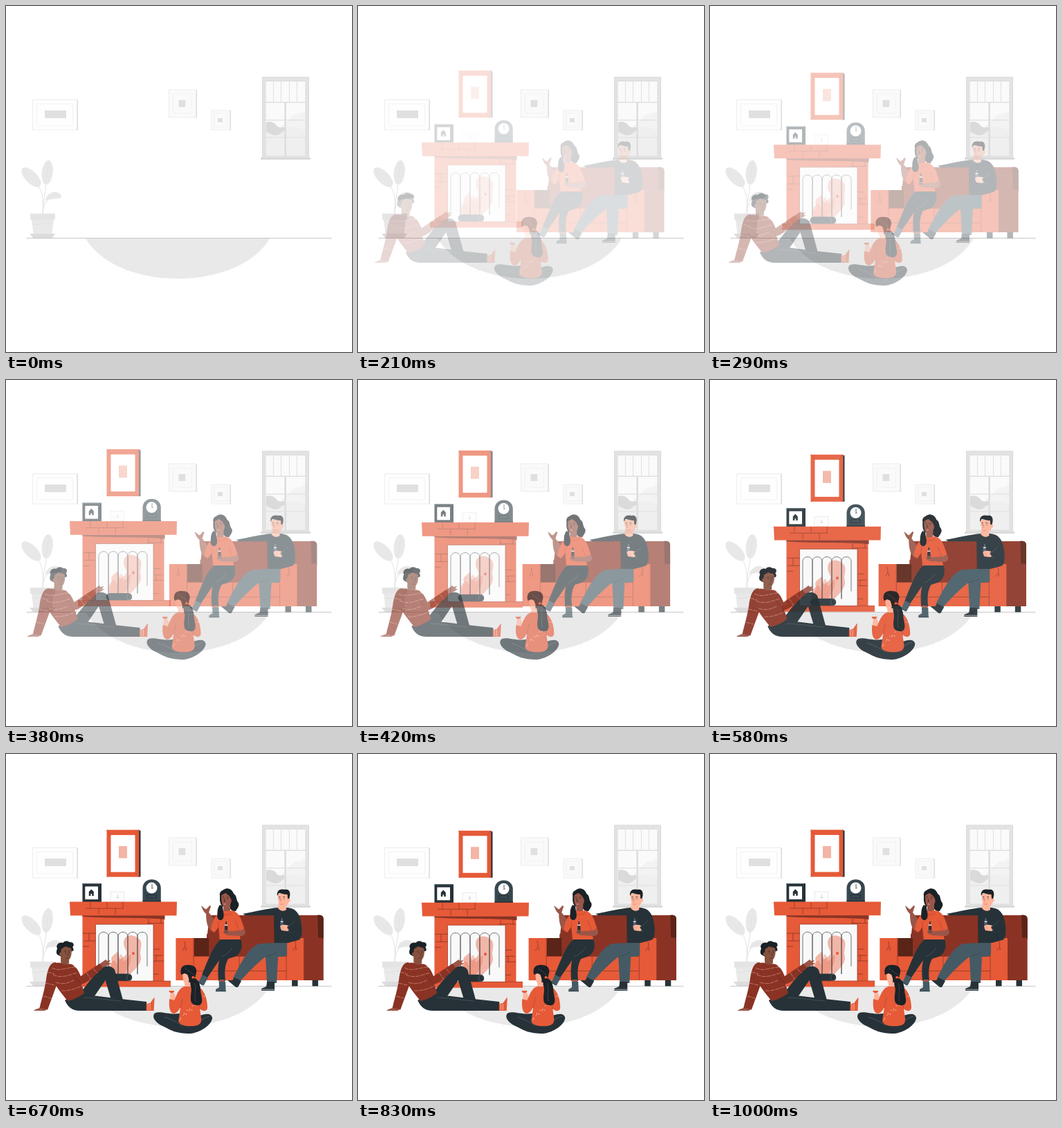
Animation of 500 by 500 pixels, one loop 1.04 s. Source, as an HTML page with a canvas:

```html
<!DOCTYPE html>
<html lang="en">
<head>
<meta charset="utf-8">
<title>Evening at home</title>
<style>
html, body { margin: 0; width: 100%; height: 100%; overflow: hidden; background: #fff; }
canvas { display: block; width: 100vmin; height: 100vmin; margin: 0 auto; }
</style>
</head>
<body>
<canvas id="stage"></canvas>
<script>
const SIZE = 500, LOOP = 1040, FPS = 24, SLIDE = 20;
const ORANGE = '#e65a38', RED = '#8a3324', BROWN = '#5b2418', DARK = '#263238',
      SLATE = '#455a64', HAIR = '#1b2227', TAN = '#9a5648', PEACH = '#ffb59b', GREY = '#e0e0e0';

const stage = document.getElementById('stage');
const scale = window.devicePixelRatio || 1;
const layer = document.createElement('canvas');
for (const c of [stage, layer]) c.width = c.height = SIZE * scale;
const out = stage.getContext('2d'), tmp = layer.getContext('2d');
let g = out;

const fill = (color, d) => { g.fillStyle = color; g.fill(new Path2D(d)); };
const line = (color, w, d) => { g.strokeStyle = color; g.lineWidth = w; g.stroke(new Path2D(d)); };
const rect = (color, x, y, r, b) => { g.fillStyle = color; g.fillRect(x, y, r - x, b - y); };
const oval = (color, x, y, rx, ry = rx, turn = 0) => {
  g.fillStyle = color;
  g.beginPath();
  g.ellipse(x, y, rx, ry, turn, 0, 7);
  g.fill();
};

// Cubic curve shared by movement and fading.
function ease(t) {
  const bez = (a, b, s) => 3 * (1 - s) * (1 - s) * s * a + 3 * (1 - s) * s * s * b + s * s * s;
  let lo = 0, hi = 1;
  for (let i = 0; i < 24; i++) {
    const mid = (lo + hi) / 2;
    if (bez(0.36, 0.5, mid) < t) lo = mid; else hi = mid;
  }
  return bez(-0.01, 1.38, lo);
}

function paleFrame(x, y, r, b, gap, face) {
  rect(GREY, r - 1, y, r + 1.6, b + 0.5);
  rect(face, x, y, r, b);
  line('#e6e6e6', 0.7, `M${x} ${b}V${y}H${r}V${b}Z`);
  line('#ebebeb', 0.6, `M${x + gap} ${y + gap}H${r - gap}V${b - gap}H${x + gap}Z`);
}

function windowPane() {
  rect('#e3e3e3', 370, 102.5, 438, 219);
  rect('#dadada', 368, 219, 440, 222);
  line('#d6d6d6', 0.7, 'M370.5 219V103H437.5V219');
  rect('#fafafa', 375, 108.5, 433, 217);
  fill('#f3f3f3', 'M375 178C390 182 402 172 410 163C415 157 420 153 425 156C428 153 431 152 433 152V191H375Z');
  fill('#efefef', 'M375 182C395 187 405 176 412 175C420 174 427 180 433 178V217H375Z');
  fill('#dadada', 'M376 168C383 166 388 168 392 174C396 177 400 175 403 175V180C397 183 395 187 390 187C384 187 381 183 376 182Z');
  line(GREY, 1, 'M386.5 109V139M397.5 109V139M409.5 109V139M420.5 109V139');
  rect(GREY, 375, 138.5, 433, 140);
  rect('#dedede', 402.3, 140, 405, 217);
  line(GREY, 1.2, 'M375 164.8H433M375 190H433');
  line('#d9d9d9', 0.8, 'M375 108.5H433V217H375Z');
}

function plant() {
  line('#e0e0e0', 0.9, 'M53 300C54 283 54 270 46 259M53 300C53 285 57 270 58 257M53 296C55 287 58 281 63 278');
  oval('#e8e8e8', 36.5, 247.5, 8.7, 18, -0.78);
  oval('#e8e8e8', 59.7, 240.5, 8, 17.6, 0.12);
  fill('#e8e8e8', 'M57 282C58 273 65 268 73 269C78 270 81 274 80 277C74 280 65 277 57 282Z');
  line('#dedede', 0.5, 'M25 236L47 260M62 226L57 255M60 279C66 274 72 273 78 275');
  rect('#e4e4e4', 35, 300, 71, 308.5);
  fill('#e9e9e9', 'M37 308.5H69L66.5 330H39.5Z');
  line('#dcdcdc', 0.7, 'M37 309H69M40 315C50 318 59 309 67 315');
  fill('#dcdcdc', 'M34 329H71L67 335H39Z');
}

function room() {
  rect('#fff', 0, 0, SIZE, SIZE);
  paleFrame(38.5, 135.5, 102.5, 179, 6, '#fefefe');
  rect(GREY, 56, 151, 87, 162);
  paleFrame(235.5, 121, 274.5, 161, 6, '#fafafa');
  rect(GREY, 249.5, 136, 259.3, 146);
  paleFrame(297, 151, 323.5, 179, 4, '#fafafa');
  rect(GREY, 306, 162, 313, 168);
  windowPane();
  plant();
  for (let i = 0; i < 15; i++) {
    const x = 160 + i * 12.5, k = (x - 248) / 133;
    const y = 336 + 58 * Math.pow(1 - k * k, 0.75);
    line('#f3f3f3', 0.6, `M${x} ${y - 2}v7`);
  }
  fill('#e9e9e9', 'M115 335.5C135 371 187 394 248 394C309 394 362 371 381 335.5Z');
  line('#b9b9b9', 0.8, 'M29.5 335.5H470.5');
}

function redFrame() {
  fill(DARK, 'M191 109.5L194.5 111V177.5H191Z');
  rect(ORANGE, 145.5, 109.5, 192.3, 177.5);
  line('#b9442a', 0.6, 'M145.5 109.5L151.5 117M192 109.5L186.5 117M145.5 177.5L151.5 171M192 177.5L186.5 171');
  rect('#fff', 151.5, 117, 186.5, 170.5);
  rect('#f3b5a5', 163, 133, 175, 150.5);
}

function mantelItems() {
  rect(DARK, 110.5, 187, 138, 214);
  rect(SLATE, 110.5, 187, 136, 188.2);
  rect('#fff', 114.3, 191.3, 133, 210);
  fill(DARK, 'M119.8 199L123.3 195.3L126.8 199V204.8H124.2V202H122.4V204.8H119.8Z');

  rect('#fdfdfd', 151, 199, 171, 213.5);
  line('#dedede', 0.7, 'M151 213V199H171V213Z');
  line('#c9c9c9', 0.8, 'M161.5 203.5V209M159.5 207.5H163');

  fill('#37474f', 'M197.5 213.5V194C197.5 177 223.8 177 223.8 194V213.5Z');
  rect(DARK, 197.5, 211.5, 224, 213.7);
  oval('#fff', 210.5, 193.5, 8);
  line(DARK, 0.8, 'M211 187.5V194.5L212.5 193');
  line('#1f2a30', 0.8, 'M203.5 203.5H217.5V208H203.5Z');
}

function fireplace() {
  mantelItems();
  rect(ORANGE, 110.5, 233, 228.5, 329);
  fill(RED, 'M110.5 233H229.5V239C200 236 160 238 110.5 235Z');
  rect('#f9f9f9', 129.5, 246, 213, 328);
  line(RED, 0.7, 'M129.5 328V246H213V328');
  fill(ORANGE, 'M92 213.5H247L246.5 233.3H93Z');
  line(RED, 0.7, 'M115 223H170M122 214V223M146 214V223M169 214V223M134 223V232M158 223V232');
  line(RED, 0.8, 'M204 244.5H228M206 238V244.5M224 238V245M111 259H130M120 259V270M112 270H129M111 278H120M213 282H223M213 291H227M217 291V299M213 299H228M213 318H221');

  g.globalAlpha = 0.42;
  fill(ORANGE, 'M174 264C180 260 189 263 194 269C198 277 192 284 195 293C196 303 186 311 180 318H150C145 312 149 304 153 300C150 291 158 291 160 286C166 288 161 296 165 297C170 293 177 290 173 283C169 276 169 268 174 264Z');
  g.globalAlpha = 0.3;
  fill(ORANGE, 'M150 318C148 310 153 306 154 299C160 297 158 304 162 305C160 296 163 293 166 289C171 293 168 300 171 299C176 297 176 291 180 290C182 300 176 312 170 318Z');
  g.globalAlpha = 1;
  oval(ORANGE, 184, 288, 1.9, 2.2);
  fill(DARK, 'M149 317.5H177C184 318 184 328 177 328H149C143 327 143 318.5 149 317.5Z');
  oval(SLATE, 177.5, 322.8, 3.5, 4.8);
  oval(DARK, 177.8, 322.8, 2.8, 4);
  for (let i = 0; i < 5; i++) {
    const x = 134 + i * 14;
    line('#3c4448', 0.75, `M${x} 318V264C${x} 255 ${x + 14} 255 ${x + 14} 264V${i < 4 ? 318 : 307}`);
  }
  rect(ORANGE, 104, 327.8, 238, 336.5);
  line(RED, 0.6, 'M104 328H238');
}

function sofa() {
  rect(DARK, 413, 326, 421.5, 335.5);
  rect(DARK, 442.5, 326, 451, 335.5);
  fill(RED, 'M294 233H448C456 232 458.7 234 458.7 239V268H290Z');
  fill(BROWN, 'M450 233C457 232 458.7 235 458.7 239V266H451Z');
  rect(RED, 290, 260, 406, 294);
  line(BROWN, 0.8, 'M387.5 233V292');
  rect(BROWN, 271, 266, 293, 293);
  rect(ORANGE, 270, 292, 406, 327);
  line(RED, 0.7, 'M271 313.5H405M271 292.5H405M337 293V313');
  rect(ORANGE, 245.3, 266, 271.3, 327);
  rect(RED, 429, 265.5, 458.7, 327);
  rect(ORANGE, 405, 266, 430, 327);
  line(RED, 0.7, 'M271 266V327M405 266V327');
  line(RED, 0.8, 'M257 270C260 275 259 279 255 284M260 279V284M417 270C420 275 419 279 414 284M419 279V284');
}

function bottle(x, y, color) {
  fill(color, `M${x - 0.9} ${y}h1.8v5l1.3 3v8h-4.4v-8l1.3-3Z`);
  rect('#e9e9e9', x - 2, y + 4.5, x + 2, y + 6);
}

function hostess() {
  fill(HAIR, 'M313 197C320 191 327 196 329 202C334 205 332 210 335 214C339 219 333 224 332 227C327 228 324 224 321 221L312 220C308 214 309 209 309 205C308 201 310 198 313 197Z');
  fill(TAN, 'M314 216H324V231H314Z');
  fill(TAN, 'M311 205C312 199 322 199 325 204C328 211 324 220 319 222C313 222 311 217 311 205Z');
  fill(HAIR, 'M310 206C309 199 319 195 325 199C330 203 329 211 326 213C325 207 321 203 317 201C315 202 312 203 310 206Z');
  line(HAIR, 0.7, 'M312.5 206.5l2-.5M318.5 207l3 .3M316 209l-1 4h2');
  oval(HAIR, 314, 208.8, 0.5);
  oval(HAIR, 320, 209.5, 0.5);
  line('#e9d3cd', 0.7, 'M314.5 217h3');
  fill(TAN, 'M300 257C291 255 289 242 289 231C286 229 283 223 282 219L288 224C289 225 291 223 294 219L296 220L293 229L300 238Z');
  fill(ORANGE, 'M314 226C319 229 324 226 327 226C337 229 340 239 344 252L340 258L337 257L339 271H309L307 250L301 258L296 254C297 244 302 230 314 226Z');
  line('#b9442a', 0.7, 'M314 231C318 233 323 232 327 230M331 241L337 257M307 242L307 251');
  fill(HAIR, 'M309 218C304 224 306 231 305 235C306 242 314 242 314.5 234C315 230 313 226 313 220Z');
  fill(TAN, 'M344 252C348 259 345 263 339 263L320 262L314 259L315 254L323 256L339 255Z');
  bottle(318, 242, DARK);
  line(TAN, 2.2, 'M315 255L321 256M315 258L321 259');
  fill(DARK, 'M310 268H339C343 278 339 290 330 293L321 296C315 306 316 319 317 328H307C306 316 306 307 308 298L291 323L283 319C291 300 299 277 310 268Z');
  line('#53636b', 0.6, 'M311 293C317 291 323 286 327 280');
  fill(SLATE, 'M283 319L292 323L288 330L286 334C283 335 278 330 275 328L280 327Z');
  rect(TAN, 308, 326, 316, 331);
  fill(SLATE, 'M307.5 329H317L317.5 343H303V340L308 337Z');
  line(DARK, 0.8, 'M303 342.8H318M275 328.5L285 334.3');
}

function guest() {
  fill(DARK, 'M393 222C378 223 359 228 342 231L346 233.3H387L388 273H407L422 269C429 268 428 250 426 242C424 230 418 223 407 222Z');
  fill(PEACH, 'M394 214H405V225C401 228 396 227 393 223Z');
  fill(PEACH, 'M392.5 202H408C411 209 409 219 403 220C396 220 392.5 216 392.5 202Z');
  oval(PEACH, 408.5, 211, 2.2, 2.8);
  fill(HAIR, 'M392 205C390 197 397 194 403 196C410 194 412 202 409 209L407 209L406.5 203C401 203 397 201 394 201Z');
  line(HAIR, 0.8, 'M394 206.8l2.4-.4M400 206.6l3 .3');
  oval(HAIR, 395.8, 209.2, 0.6);
  oval(HAIR, 401.8, 209.5, 0.6);
  line('#d77b62', 0.8, 'M398 209l-1.5 4H398M396 216.5c2 1.2 4 .8 5-.3');
  fill(SLATE, 'M387 273H406V290C402 294 397 293 393 293L391 331H377L375 293C363 302 350 315 338 329L328 324C339 303 350 279 366 274Z');
  line('#33464f', 0.7, 'M375 293C381 291 387 290 391 287');
  fill(DARK, 'M330 323L340 328L335 337L332 337L320 327L327 327Z');
  fill(DARK, 'M377 329H388V342H369V339L376 336Z');
  line('#fff', 0.6, 'M369 340.3H388');
  bottle(398.5, 237, '#53617a');
  fill(PEACH, 'M396 249C398 246 406 246 409 249L412 252L407 256L398 255Z');
  line('#e08970', 0.6, 'M397 250.6H402M397 253H402');
  fill(DARK, 'M417 242C413 245 409 247 406 250L411 258C415 264 422 271 426 263Z');
  line('#506069', 0.6, 'M417 241C415 245 410 247 407 250M406 251L411 258');
}

function couch() {
  sofa();
  guest();
  hostess();
}

function girl() {
  fill(DARK, 'M250 375C237 377 222 371 216 374C209 378 215 388 226 393C240 400 246 404 266 404C280 403 298 391 298 381C296 373 286 376 280 378Z');
  line('#53636b', 0.7, 'M229 380C240 384 248 388 255 393M281 385C286 382 290 380 294 379');
  fill(PEACH, 'M255.5 314H268V339H258V331C255.5 329 255 321 255.5 314Z');
  fill('#efefef', 'M235.2 340H243.2C243.5 347 236 348 235.2 340Z');
  fill(ORANGE, 'M235.2 342H243.2C242.5 347 236.3 347 235.2 342Z');
  line('#c9c9c9', 0.6, 'M239.2 346V354M236.5 354H242M235.2 340H243.2');
  fill(PEACH, 'M237 347L243 345L245 351L243 357H237Z');
  fill(ORANGE, 'M258 336C253 337 250 341 247 347L243 356L236 354C235 364 236 374 242 375C247 375 250 369 252 366L249 386C251 393 263 394 272 393C280 392 283 388 282 382L280 368C285 373 291 372 291 366C291 352 285 338 276 336Z');
  line('#b9442a', 0.7, 'M252 367L255 352M280 369L278 353');
  for (let i = 0; i < 22; i++) {
    const x = 240 + (i * 17) % 47, y = 345 + (i * 29) % 45;
    if (x < 250 && (y > 372 || y < 357) || x > 281 && y > 367) continue;
    line('#ffd5c8', 0.8, `M${x} ${y}l1 ${i % 2 ? 2 : -1.5}`);
  }
  fill(HAIR, 'M253 319C250 308 257 304 265 305C274 305 277 312 274 319C274 325 270 331 264 330C265 325 263 318 258 317Z');
  oval(PEACH, 260.5, 321.5, 2.1, 3.2);
  oval(ORANGE, 271.3, 324.5, 2.2, 4, -0.6);
  fill(HAIR, 'M271 324C278 325 280 331 281 340C281 348 286 357 281 362C276 365 267 362 267 356C266 348 269 342 267 336C265 329 267 325 271 324Z');
  line('#4d5960', 0.6, 'M272 331C276 339 271 347 274 358M258 309C263 313 268 316 272 320');
}

function loungingMan() {
  const skin = '#87513f';
  fill(TAN, 'M49 366L59 369L56 371H40C42 368 46 369 49 366Z');
  fill(RED, 'M72 301C63 301 60 312 58 325C56 340 51 355 48.5 367L60 369.5L73 334Z');
  fill(DARK, 'M85 356C94 348 110 350 125 349L166 354L203 358V371H107C95 371 89 365 85 356Z');
  fill(ORANGE, 'M202.5 361L208 360C210 358 212 354 214.5 351.5L213.5 371H202.5Z');
  line('#fff', 0.6, 'M205 361V370M208 361V370');
  fill(DARK, 'M96 355C106 349 120 328 134 312C140 305 153 305 157 312L169 356L151.5 354L143.5 327L127 351L108 363Z');
  line('#53636b', 0.6, 'M112 352C124 352 145 355 166 357');
  fill(RED, 'M65 304C71 301 76 301 80 302C86 304 92 302 97 305C102 310 104 317 106 322L113 345C107 351 97 355 89 357C82 348 71 335 68 327Z');
  fill(skin, 'M79 293H91V302C88 305 82 305 79 301Z');
  fill(HAIR, 'M76 291C71 289 73 284 74 281C71 276 77 271 82 273C86 268 91 271 92 272C98 271 99 277 96 279C99 283 97 285 95 285L80 293Z');
  fill(skin, 'M79.5 282C82 280 84 279 86 278C89 280 92 279 94 281C96 289 93 298 88 299C82 299 79 295 79 289Z');
  oval(skin, 78.8, 289, 2, 2.6);
  line(HAIR, 0.7, 'M84 285.2l3-.4M90 284.8l2.4.3');
  oval(HAIR, 86, 287.4, 0.6);
  oval(HAIR, 91, 287.4, 0.6);
  line('#4d281f', 0.7, 'M89 288l1 3.5h-1.6M86 295h4');
  fill(TAN, 'M134 304L140 300L144 297L146 299L151 298L148 302L152 302L146 306L139 309Z');
  fill(RED, 'M100 308C104 311 106 317 108 321L135 303L140 309C132 316 119 330 111 332C104 333 99 326 97 319Z');
  line('#652519', 0.7, 'M97 319C101 324 104 329 109 332');
  g.setLineDash([6, 1.2]);
  line('#dfa190', 0.6, 'M66 309C77 315 90 308 99 308M68 319C80 325 92 319 103 316M72 330C84 334 91 330 98 327M80 342C91 343 104 338 111 334M60 315L70 318M57 331L70 334M54 350L65 353M116 316L122 325M126 310L132 317');
  g.setLineDash([]);
}

const groups = [
  [redFrame, 0, 1],
  [fireplace, 0, 1],
  [couch, 1, 0],
  [girl, 1, 0],
  [loungingMan, 1, 0]
];

function render(ms) {
  const step = Math.min(FPS, Math.floor((ms + 4) * FPS / 1000));
  const k = ease(Math.min(1, (step + 0.5) / FPS)), shift = (k - 1) * SLIDE;
  g = out;
  out.setTransform(scale, 0, 0, scale, 0, 0);
  room();
  if (step < 2) return;
  for (const [draw, dx, dy] of groups) {
    g = tmp;
    tmp.setTransform(scale, 0, 0, scale, 0, 0);
    tmp.clearRect(0, 0, SIZE, SIZE);
    tmp.translate(dx * shift, dy * shift);
    draw();
    out.globalAlpha = Math.max(0, Math.min(1, k));
    out.drawImage(layer, 0, 0, SIZE, SIZE);
    out.globalAlpha = 1;
  }
}

const start = performance.now();
function tick() {
  render((performance.now() - start) % LOOP);
  requestAnimationFrame(tick);
}
tick();
</script>
</body>
</html>
```
